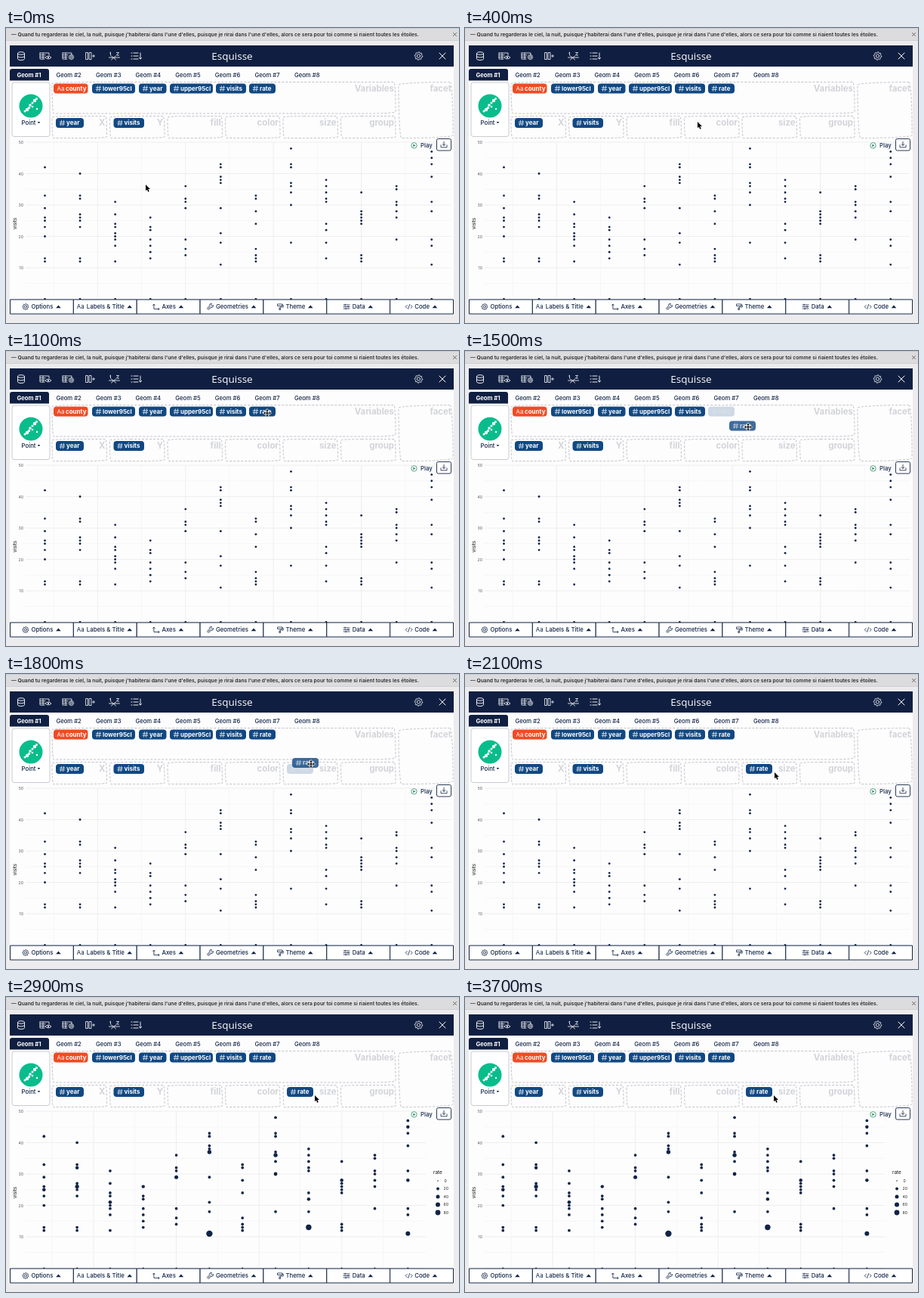
Recreate the animation shown at these times as an HTML page with a canvas. Size 600 px wide and 390 px high, loop 3.8 s.

```html
<!DOCTYPE html>
<html lang="fr">
<head>
<meta charset="utf-8">
<title>Esquisse</title>
<style>
html, body { margin: 0; width: 100%; height: 100%; overflow: hidden; background: #ececee; }
canvas { display: block; width: 600px; height: 390px; }
</style>
</head>
<body>
<canvas id="stage"></canvas>
<script>
const canvas = document.getElementById('stage');
const ctx = canvas.getContext('2d');
const dpr = window.devicePixelRatio || 1;
canvas.width = 600 * dpr;
canvas.height = 390 * dpr;

const LOOP = 3800, STEP = 100;
const GRAB = 1300, DROP = 2100, REPLOT = 2700;
const NAVY = '#112446', BLUE = '#114882', ORANGE = '#f04b23', GREEN = '#08bd8b';
const SANS = 'Inter, "Open Sans", sans-serif';

// visits per year, one row per year
const VISITS = [
  '42 33 29 26 25 23 20 13 12', '40 33 32 27 26 25 23 13 12',
  '31 27 24 23 21 20 19 17 12', '26 23 22 19 17 15 13',
  '36 32 31 29 19 16 14', '43 42 39 38 37 29 21 18 11',
  '33 32 28 24 16 14 13 12', '48 43 42 37 36 34 30 18',
  '38 36 34 32 31 24 22 18 13', '34 28 27 26 25 24 14 13 12',
  '36 35 31 30 28 26 19', '47 45 43 39 31 28 19 17 11'
].map(row => row.split(' ').map(Number));

// radii of the points with a high rate, keyed by column:visits
const BIG = {
  '0:25': 2.3, '1:26': 2.6, '1:32': 2.2, '2:21': 2.3, '3:26': 2.2, '4:29': 2.5,
  '5:37': 2.7, '5:11': 4.2, '7:36': 2.7, '7:30': 2.4, '8:22': 2.2, '8:13': 3.7,
  '9:28': 2.2, '11:28': 2.2, '11:45': 2.2, '11:11': 3
};

// cursor: time, x, y
const PATH = [[0, 185, 207], [400, 308, 124], [700, 346, 82], [1200, 346, 82],
  [1800, 404, 119], [2100, 410, 130], [2500, 410, 130], [2700, 409, 130], [LOOP, 409, 130]];

function text(s, x, y, size, color = NAVY, weight = 500, align = 'left', family = SANS) {
  ctx.font = `${weight} ${size}px ${family}`;
  ctx.fillStyle = color;
  ctx.textAlign = align;
  ctx.fillText(s, x, y);
}

function rect(x, y, w, h, color) {
  ctx.fillStyle = color;
  ctx.fillRect(x, y, w, h);
}

function box(x, y, w, h, r, fill, stroke, lw = 1) {
  ctx.beginPath();
  ctx.roundRect(x, y, w, h, r);
  if (fill) { ctx.fillStyle = fill; ctx.fill(); }
  if (stroke) { ctx.strokeStyle = stroke; ctx.lineWidth = lw; ctx.stroke(); }
}

function dot(x, y, r, color = NAVY) {
  ctx.beginPath();
  ctx.arc(x, y, r, 0, 7);
  ctx.fillStyle = color;
  ctx.fill();
}

function line(x1, y1, x2, y2, color, lw = 1) {
  ctx.beginPath();
  ctx.moveTo(x1, y1);
  ctx.lineTo(x2, y2);
  ctx.strokeStyle = color;
  ctx.lineWidth = lw;
  ctx.stroke();
}

function icon(d, x, y, color, lw = 0.9) {
  ctx.save();
  ctx.translate(x, y);
  ctx.strokeStyle = color;
  ctx.lineWidth = lw;
  ctx.lineCap = ctx.lineJoin = 'round';
  ctx.stroke(new Path2D(d));
  ctx.restore();
}

function shape(d, x, y, color) {
  ctx.save();
  ctx.translate(x, y);
  ctx.fillStyle = color;
  ctx.fill(new Path2D(d));
  ctx.restore();
}

function gear(x, y, r, color) {
  icon(`M${r * 0.4} 0A${r * 0.4} ${r * 0.4} 0 1 1 ${-r * 0.4} 0A${r * 0.4} ${r * 0.4} 0 1 1 ${r * 0.4} 0`, x, y, color, 0.8);
  ctx.beginPath();
  for (let i = 0; i <= 32; i++) {
    const a = i * Math.PI / 16, k = i % 4 < 2 ? r : r * 0.78;
    ctx.lineTo(x + k * Math.cos(a), y + k * Math.sin(a));
  }
  ctx.strokeStyle = color;
  ctx.lineWidth = 0.8;
  ctx.stroke();
}

function chip(label, x, cy, w, alpha = 1) {
  const isText = label === 'county';
  ctx.globalAlpha = alpha;
  box(x, cy - 6.5, w, 13, 4, isText ? ORANGE : BLUE);
  if (isText) text('Aa', x + 4.5, cy + 2.8, 7.8, '#fff', 400);
  else icon('M-1-3.3L-2 3.3M2-3.3L1 3.3M-3.2-1.3H3.4M-3.4 1.3H3.2', x + 8.5, cy, '#fff', 0.7);
  text(label, x + (isText ? 16 : 14), cy + 2.6, 8, '#fff', 700);
  ctx.globalAlpha = 1;
}

function dropZone(label, x, y, w, h) {
  ctx.setLineDash([3, 2]);
  box(x, y, w, h, [{ x: 125, y: 7 }, { x: 7, y: 110 }, { x: 110, y: 7 }, { x: 7, y: 125 }], null, '#c2c3c8');
  ctx.setLineDash([]);
  text(label, x + w - 2, y + 12.5, 11.4, '#d3d4d9', 700, 'right');
}

function titleBar() {
  rect(0, 0, 600, 390, '#ececee');
  rect(0, 0, 600, 16, '#dcdbde');
  rect(0, 0, 600, 1, '#c6ced9');
  rect(0, 16, 600, 1, '#d0cfd2');
  text("— Quand tu regarderas le ciel, la nuit, puisque j'habiterai dans l'une d'elles, puisque je rirai dans l'une d'elles, alors ce sera pour toi comme si riaient toutes les étoiles.",
    7, 11, 6.75, '#2b2b2d', 600);
  icon('M-2-2L2 2M2-2L-2 2', 594.5, 8.5, '#555');
}

function header() {
  rect(5, 23, 588, 356, '#fdfdfe');
  rect(5, 23, 588, 28, '#101f41');
  const w = '#fff', table = 'M-7-4H5V-1M-7-4V4H-1M-7-1.3H0M-7 1.4H-1M-3-4V4';
  icon('M-4.5-3.5A4.5 1.8 0 1 1 4.5-3.5A4.5 1.8 0 1 1-4.5-3.5V3.7A4.5 1.8 0 0 0 4.5 3.7V-3.5M-4.5 0A4.5 1.8 0 0 0 4.5 0', 20, 37, w);
  icon(table + 'M0 2Q4-2 8 2Q4 6 0 2', 52, 37, w, 0.8);
  dot(56, 39, 1, w);
  icon(table, 82, 37, w, 0.8);
  gear(86.5, 38.5, 3.3, w);
  icon('M-5-4.5H-2.5V4.5H-5ZM-.5-4.5H2V4.5H-.5ZM3.5 0H6.5M5-1.5V1.5', 111, 37, w, 0.8);
  icon('M-6-4L-5-5V-1M3-4.5H6L3-1H6M-7 2H7M-4 0L2 5M-4 5L2 0', 143.5, 37, w, 0.8);
  icon('M-7-4H-6M-4-4H2M-7 0H-6M-4 0H2M-7 4H-6M-4 4H2M5-4V4M3.4 2.4L5 4L6.6 2.4', 173, 37, w);
  text('Esquisse', 299.5, 42, 13.5, w, 400, 'center', '"Open Sans", sans-serif');
  gear(546.5, 37, 5.3, w);
  icon('M-4-4L4 4M4-4L-4 4', 578, 37, w, 1);
}

function tabs() {
  box(5, 54, 52, 15.5, [3, 3, 0, 0], '#101f41');
  for (let i = 0; i < 8; i++) {
    text('Geom #' + (i + 1), 30.5 + i * 52.6, 65, 7.7, i ? NAVY : '#fff', i ? 500 : 700, 'center');
  }
}

function geomPicker() {
  box(8, 72, 50, 71.5, 3, '#fff', '#c9cbd1');
  dot(33, 103, 15.5, GREEN);
  [[25, 110, 1.5], [28, 108, 2.2], [30.5, 105.5, 1.7], [32, 102, 1.8], [35, 104, 1.3],
    [35, 99, 1.5], [38, 96, 2.2], [40.5, 93.5, 1.5], [41, 107, 1.2]].forEach(p => dot(...p, '#fff'));
  text('Point', 20.5, 128, 7.8);
  shape('M-1.8-1H1.8L0 1.2Z', 43.5, 125, NAVY);
}

function zones() {
  dropZone('Variables', 61, 71.5, 455, 41.5);
  dropZone('facet', 520, 71.5, 72, 74);
  ['X', 'Y', 'fill', 'color', 'size', 'group'].forEach((s, i) =>
    dropZone(s, 61 + i * 76.5, 116.5, 72.5, 29));
}

function plot(sized) {
  const x0 = sized ? 50.3 : 51.5, dx = sized ? 43.82 : 46.57;
  const left = 26, right = x0 + dx * 11.55;
  const px = i => x0 + dx * i, py = v => 358.5 - v * 4.15;
  ctx.save();
  ctx.beginPath();
  ctx.rect(5, 148, 588, 211);
  ctx.clip();
  for (let v = 0; v <= 50; v += 5) line(left, py(v), right, py(v), v % 10 ? '#f6f6f7' : '#eeeeef');
  for (let k = 0; k < 9; k++) {
    const x = px(0.25 + k * 1.25);
    line(x, 151, x, 359, k % 2 ? '#eeeeef' : '#f6f6f7');
  }
  for (let v = 10; v <= 50; v += 10) text(v, 23, py(v) + 2.2, 5.2, '#55565c', 400, 'right');
  VISITS.forEach((col, i) => {
    for (const v of col) dot(px(i), py(v), sized ? BIG[i + ':' + v] || 1.85 : 1.4);
    dot(px(i), py(0), sized ? 1 : 1.4);
  });
  ctx.restore();

  ctx.save();
  ctx.translate(14, 258.5);
  ctx.rotate(-Math.PI / 2);
  text('visits', 0, 0, 6.4, '#111', 400, 'center');
  ctx.restore();

  if (!sized) return;
  text('rate', 566, 233.5, 6.4, '#111', 400);
  [0.8, 1.9, 2.5, 3, 3.4].forEach((r, i) => {
    const y = 243 + i * 10.5;
    dot(572, y, r);
    text(i * 20, i ? 579.5 : 580.5, y + 1.9, 5.2, '#222', 400);
  });
}

function plotTools() {
  ctx.beginPath();
  ctx.arc(540.5, 155.3, 3.7, 0, 7);
  ctx.strokeStyle = '#2f8f62';
  ctx.lineWidth = 0.8;
  ctx.stroke();
  shape('M-1.2-1.9L2 0L-1.2 1.9Z', 540.5, 155.3, '#2f8f62');
  text('Play', 549, 158, 7.8);
  box(570.5, 146.5, 19, 15.5, 2, '#fff', NAVY, 0.9);
  icon('M0-4V1M-1.8-.8L0 1L1.8-.8M-4 .5V3.5H4V.5', 580, 154.3, NAVY, 0.8);
}

const MENU = [
  ['Options', 'gear'],
  ['Labels & Title', 'Aa'],
  ['Axes', 'M-3-3V3H4M-4.2-2L-3-3.5L-1.8-2M2.8 1.8L4.2 3L2.8 4.2'],
  ['Geometries', 'M-3.5 3.5L0 0M-2 4L1 1M-4 2L-1-1A2.4 2.4 0 0 1 2-4L1-2L2-1L4-2A2.4 2.4 0 0 1 1 1'],
  ['Theme', 'M-3-3.5H3V-1H-3ZM3-2.3H4.3V.5H0V2M-.7 2H.7V4H-.7Z'],
  ['Data', 'M-4-2.5H4M-4 0H4M-4 2.5H4M-2-3.4V-1.6M2-.9V.9M-1 1.6V3.4'],
  ['Code', 'M-2.5-2L-4.5 0L-2.5 2M2.5-2L4.5 0L2.5 2M.9-3L-.9 3']
];

function menu() {
  const w = 587 / 7, cy = 368.5;
  MENU.forEach(([label, glyph], i) => {
    const x = 5.5 + i * w;
    box(x, 359, w, 19, 0, '#fff', NAVY);
    ctx.font = `500 7.8px ${SANS}`;
    const tw = ctx.measureText(label).width;
    const start = x + (w - tw - 22) / 2;
    if (glyph === 'gear') gear(start + 4, cy, 4, NAVY);
    else if (glyph === 'Aa') text(glyph, start - 1.5, cy + 2.8, 7.8, NAVY, 400);
    else icon(glyph, start + 4, cy, NAVY, 0.8);
    text(label, start + 11.5, cy + 2.8, 7.8);
    shape('M-3.3 1.8L0-1.9L3.3 1.8Z', start + tw + 18.5, cy, NAVY);
  });
}

function cursorAt(t) {
  const i = PATH.findIndex((p, k) => k && t <= p[0]);
  const [t0, x0, y0] = PATH[i - 1], [t1, x1, y1] = PATH[i];
  const k = (t - t0) / (t1 - t0);
  return [x0 + (x1 - x0) * k, y0 + (y1 - y0) * k];
}

function pointer(x, y, moving) {
  const d = moving
    ? 'M0-5L1.8-3H.6V-.6H3V-1.8L5 0L3 1.8V.6H.6V3H1.8L0 5L-1.8 3H-.6V.6H-3V1.8L-5 0L-3-1.8V-.6H-.6V-3H-1.8Z'
    : 'M0 0V8.3L1.9 6.6L3.2 9.7L4.7 9.1L3.4 6H6Z';
  icon(d, x, y, '#fff', 1.3);
  shape(d, x, y, '#000');
}

function chips(t, x, y) {
  const dragging = t >= GRAB && t < DROP;
  const overSize = x > 367 && y > 115;
  chip('county', 63, 80, 45.5);
  chip('lower95cl', 114, 80, 57);
  chip('year', 176, 80, 36.5);
  chip('upper95cl', 217, 80, 57);
  chip('visits', 278, 80, 40);
  chip('rate', 322, 80, 35, dragging && !overSize ? 0.2 : 1);
  chip('year', 66, 125.5, 37);
  chip('visits', 142.5, 125.5, 40.5);
  if (t >= DROP) chip('rate', 372, 125.5, 35);
  if (!dragging) return;
  if (overSize) chip('rate', 372, 125.5, 35, 0.2);
  chip('rate', x - 25, y - 1.5, 35, 0.8);
}

function draw(t) {
  const [x, y] = cursorAt(t);
  const onChip = x >= 322 && x <= 357 && y >= 73 && y <= 87;
  ctx.setTransform(dpr, 0, 0, dpr, 0, 0);
  titleBar();
  header();
  tabs();
  geomPicker();
  zones();
  plot(t >= REPLOT);
  plotTools();
  menu();
  chips(t, x, y);
  pointer(x, y, onChip || (t >= GRAB && t < DROP));
}

let last = -1;
function tick() {
  const t = Math.floor(performance.now() % LOOP / STEP) * STEP;
  if (t !== last) draw(last = t);
  requestAnimationFrame(tick);
}
tick();
</script>
</body>
</html>
```
